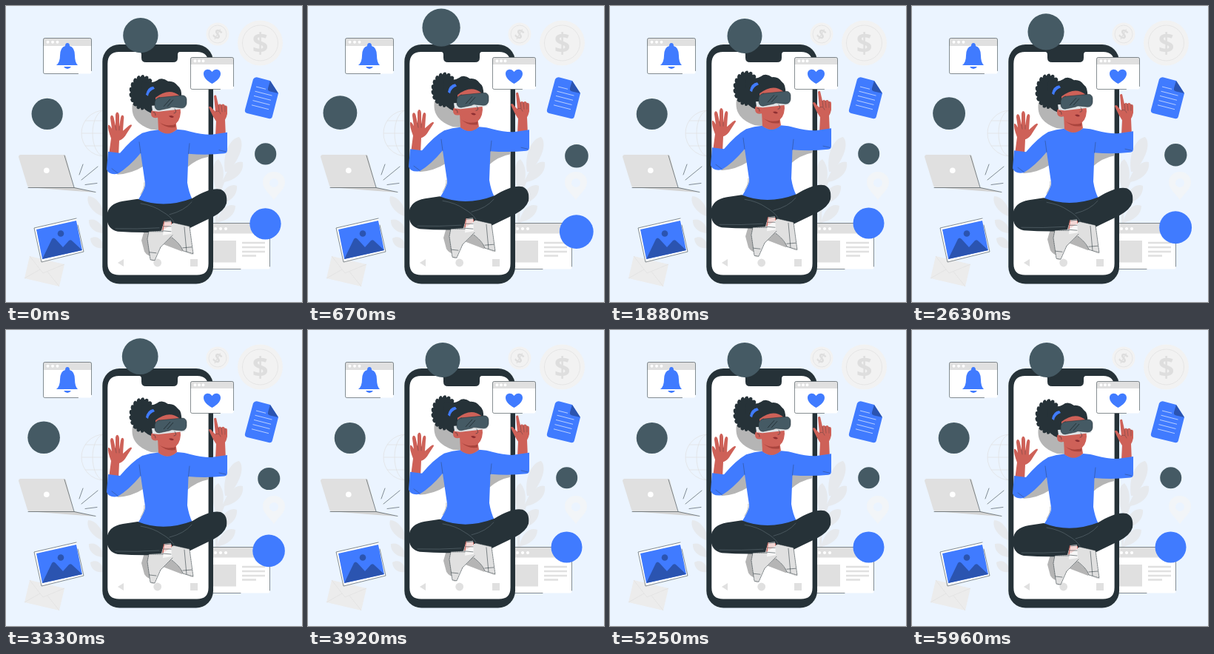
An HTML page for the animation above (6 s loop, 400 by 400 pixels).

```html
<!DOCTYPE html>
<html lang="en">
<head>
<meta charset="utf-8">
<title>Floating with a headset</title>
<style>
  html, body { margin: 0; width: 100%; height: 100%; overflow: hidden; background: #ebf4ff; }
  svg { display: block; width: 100%; height: 100%; }
  .blue { fill: #407bff; }
  .navy { fill: #2b54b0; }
  .dark { fill: #263238; }
  .slate { fill: #455a64; }
  .skin { fill: #ce6158; }
  .grey { fill: #e0e0e0; }
  .pale { fill: #f2f2f2; }
  .white { fill: #fff; }
  .line { fill: none; stroke: #263238; stroke-width: .55; stroke-linecap: round; stroke-linejoin: round; }
  .faint { fill: none; stroke: #e0e0e0; stroke-width: .7; }
  text { font-family: "Open Sans", Arial, sans-serif; font-weight: 700; text-anchor: middle; fill: #dedede; }
</style>
</head>
<body>
<svg viewBox="0 0 400 400">
  <g id="backdrop">
    <g class="faint">
      <circle cx="133" cy="172" r="31"/>
      <ellipse cx="133" cy="172" rx="16" ry="31"/>
      <path d="M102 172H164M107 155H160M107 189H160M133 141V203"/>
    </g>
    <circle class="pale" cx="343.500" cy="50" r="30.500"/>
    <circle class="faint" cx="343.500" cy="50" r="24"/>
    <text x="343.500" y="64" font-size="38">$</text>
    <circle class="pale" cx="286" cy="38" r="15.500"/>
    <circle class="faint" cx="286" cy="38" r="12"/>
    <text transform="translate(286 38) rotate(30)" y="7" font-size="19">$</text>
    <g fill="#e6e9ed">
      <path d="M284 300C280 260 290 240 301 220L303 222C292 243 284 262 287 300Z"/>
      <path d="M296 224C292 201 302 179 315 177C323 185 317 206 300 224Z"/>
      <path d="M295 236C301 218 311 208 320 211C322 224 311 235 295 238Z"/>
      <path d="M284 247C277 231 278 211 287 207C296 217 296 235 288 249Z"/>
      <path d="M286 265C292 247 304 239 312 243C313 256 303 265 286 269Z"/>
      <path d="M286 290C290 274 300 266 310 270C310 282 300 289 286 293Z"/>
      <path d="M130 284C116 279 108 266 111 257C121 257 131 269 133 284Z"/>
      <path d="M132 307C119 307 111 298 112 289C122 286 131 295 133 307Z"/>
      <path d="M132 327C121 329 114 322 114 314C123 309 131 316 133 327Z"/>
    </g>
    <path fill="#f2f5f8" fill-rule="evenodd" d="M362 262C354 251 347 247 347 238A15 14 0 0 1 377 238C377 247 370 251 362 262ZM362 233A6 6 0 1 0 362 245A6 6 0 1 0 362 233Z"/>
    <path fill="#ececec" d="M32 338L79 349L72 379L25 368Z"/>
    <path class="faint" d="M32 338L50 361L79 349M25 368L46 356M72 379L56 359"/>
  </g>

  <g id="laptop">
    <path class="grey" d="M20 201H78Q80 201 81 203L92 246H32Q30 245 29 243L17 204Q17 201 20 201Z"/>
    <path fill="#d3d3d3" d="M30 245L92 245L122 252L94 250Z"/>
    <path class="line" d="M30 245.500H92L121 251.500M79 202L92 245"/>
    <circle class="white" cx="54.800" cy="222.300" r="3.800"/>
    <path class="line" d="M99 228L104 214M102 235L124 217M107 241.500L123 239.500"/>
  </g>

  <g id="photo">
    <path class="white" d="M38 300L95 287L105 332L48 346Z"/>
    <path class="blue" d="M41 302L95 290L103 330L49 342Z"/>
    <path class="navy" d="M49 342L62 315Q64 312 67 315L77 326L85 317Q88 315 90 318L103 330Z"/>
    <circle class="navy" cx="74" cy="307.500" r="4.300"/>
    <path class="line" d="M95 287L38 300L48 346L105 332L97 296"/>
  </g>

  <g id="document">
    <path class="blue" d="M340 96.500L357 101L368 118L360 149Q359 153 355 152L326 145Q322 144 323 140L334 99Q336 95.500 340 96.500Z"/>
    <path class="navy" d="M357 101L368 118L357 115.500Q353 114.500 354 111Z"/>
    <path id="docLines" fill="none" stroke="#d6e4ff" stroke-width=".8"/>
  </g>

  <g id="page">
    <rect class="white" x="266" y="293.500" width="90.500" height="62" rx="2"/>
    <path class="grey" d="M266 293.500H354.500Q356.500 293.500 356.500 295.500V307.500H266Z"/>
    <g class="white"><circle cx="283" cy="301" r="2.100"/><circle cx="290" cy="301" r="2.100"/><circle cx="297" cy="301" r="2.100"/></g>
    <rect class="grey" x="280" y="317" width="31" height="29.500"/>
    <path stroke="#e0e0e0" stroke-width="2.300" d="M319 320H350M319 326H350M319 332H350M319 337.500H338"/>
    <path class="line" d="M270 293.500H354.500Q356.500 293.500 356.500 295.500V352M317 355.500H270"/>
  </g>

  <g id="phone">
    <rect class="dark" x="130.300" y="52" width="149.700" height="323.500" rx="23"/>
    <path class="white" d="M153 62H180Q183 62 183 66V70Q183 76 189 76H226Q232 76 232 70V66Q232 62 235 62H258Q273.600 62 273.600 78V348Q273.600 363.600 258 363.600H153Q137.300 363.600 137.300 348V78Q137.300 62 153 62Z"/>
    <path class="grey" d="M151 347L159 342V352ZM249 342H259V352H249Z"/>
    <circle class="grey" cx="204.700" cy="347" r="5.400"/>
  </g>

  <g id="person">
    <g fill="#b5b5b5">
      <path d="M171 132C168 150 178 161 196 167L210 168L215 150Z"/>
      <path d="M182 197L150 228Q170 227 187 216L190 198Z"/>
      <path d="M244 195L273.600 198V204Q257 207 244 219Z"/>
      <path d="M188 300L183 317L187 332Q192 340 201 338L212 322L238 332L247 322L229 299Z"/>
    </g>

    <path class="skin" d="M139 202L142 179Q137 166 138 161Q140 160 143 166L141 152Q141 148 143 148Q145 148 146 153L148 162L148 147Q149 143 151 144Q153 145 153 150V163L155 151Q156 147 158 148Q160 149 159 154L158 169L166 162Q170 159 170 162Q164 171 161 176Q157 181 153 182L152 203Z"/>
    <path class="skin" d="M283 176L284 156Q279 149 274 137Q276 134 279 139L283 143L281 122Q282 120 284 121L287 134Q289 131 291 134Q294 131 296 135Q299 134 299 138V146Q298 151 296 154L297 177Z"/>
    <path class="line" stroke-opacity=".6" d="M287 134L288 142M291 134L292 143M296 135V143M283 143Q288 140 290 146M148 162L149 168M153 163V168"/>

    <path class="blue" d="M184 172Q195 168 206 167.500Q218 177 231 167Q242 167.500 249 170Q266 174.500 278 174L299 171V195Q299 199 295 199.500Q272 202 246.500 200L245 239Q247 252 252 262Q234 274 205 271Q187 269 178 263Q189 246 188 240L182 199Q166 218 151 227Q139 229 136 221L138 197L154 199Q170 180 184 172Z"/>
    <path class="line" stroke-opacity=".65" d="M182 199L180 184M246.500 200L248 186M187 239Q188 246 182 255M151 226L143 220M297 197L288 195"/>

    <path class="dark" d="M178 261Q213 275 252 260Q276 245 290 248Q300 252 298 267Q295 277 280 285L249 300L236 298L214 291L209 306Q178 307 151 305Q136 302 136 284Q138 267 158 264Z"/>
    <path class="line" style="stroke:#66747b" d="M182 267Q200 270 211 278Q222 284 227 292M251 265Q241 277 221 282M148 301Q177 302 207 300"/>

    <path class="skin" d="M213 291L224 292L224 310L211 307Z"/>
    <path class="grey" d="M226 293L248 298L253 335Q253 337 250 336L239 331Q236 322 221 311Z"/>
    <path class="grey" d="M211 304L226 294L226 307Q221 316 209 326L201 344Q198 347 195 343L191 315L193 305Z"/>
    <path class="white" d="M214 291L223 290L224 308L212 310Z" opacity=".75"/>
    <path class="line" stroke-dasharray="2 1" d="M226 293L248 298L253 335L239 331Q236 322 224 313M212 305L193 305L191 315L195 343L201 344L209 326L225 310"/>
    <path class="line" d="M214 292L223 291M213 298L223 298M212 304L223 305M241 299L244 332M194 333L203 334M239 327L251 326"/>

    <path class="skin" d="M205 148L206 168Q219 178 231 167L229 154Z"/>
    <path fill="#a9443d" d="M207 157Q216 164 229 160L229 164Q216 166 207 157Z"/>
    <g class="dark">
      <path id="bun"/>
      <path d="M184 103Q198 106 207 99Q213 97 219 102Q227 101 232 108Q238 112 237 124L227 121Q214 116 205 126L202 142L196 145Q186 141 182 132Z"/>
    </g>
    <path class="skin" d="M202 124Q220 110 234 121L236 144Q235 158 226 161Q212 162 205 151Q196 153 196 145Q196 139 202 141Z"/>
    <path class="blue" d="M189 120Q191 110 199 109L201 112Q193 115 192 122Z"/>
    <path fill="#dfe5e8" d="M197 135L244 132L242 139L206 143L198 142Z"/>
    <g id="goggles">
      <path class="slate" d="M207 124L238 121Q243 121 244 126V132Q243 138 237 138L227 137Q224 136 221 138L207 141Q202 141 201 136V130Q202 125 207 124Z"/>
      <path class="line" d="M207 124L238 121Q243 121 244 126V132Q243 138 237 138L227 137Q224 136 221 138L207 141Q202 141 201 136V130Q202 125 207 124Z"/>
      <path fill="none" stroke="#263238" stroke-width="1" d="M213 136L222 126M218 136L226 127"/>
    </g>
    <path fill="#8d2f32" d="M220 149Q224 147 227 150Q224 153 220 149Z"/>
    <path class="line" d="M228 139Q232 145 227 145M199 144Q202 143 202 148"/>
  </g>

  <g id="alerts"></g>

  <g id="badges">
    <circle class="slate" cx="182" cy="40.500" r="23.500"/>
    <circle class="slate" cx="56.700" cy="146" r="21"/>
    <circle class="slate" cx="349.700" cy="199.700" r="14.500"/>
    <circle class="blue" cx="349.500" cy="293.500" r="21"/>
  </g>
</svg>

<script>
  const LOOP = 6000;
  const FLOAT = 3000;
  const LEAD = 40;
  const byId = id => document.getElementById(id);

  function alertWindow(x, y, w, h, header, dotGap, symbol) {
    const right = x + w, bottom = y + h;
    const dots = [0, 1, 2].map(i =>
      `<circle class="white" cx="${x + 6 + i * dotGap}" cy="${y + header / 2}" r="1.9"/>`).join("");
    return `<rect class="white" x="${x}" y="${y}" width="${w}" height="${h}" rx="2"/>
      <path class="grey" d="M${x} ${y + header}V${y + 2}Q${x} ${y} ${x + 2} ${y}H${right - 2}Q${right} ${y} ${right} ${y + 2}V${y + header}Z"/>
      ${dots}
      <path class="line" d="M${right - 18} ${bottom}H${x + 2}Q${x} ${bottom} ${x} ${bottom - 2}V${y + 2}Q${x} ${y} ${x + 2} ${y}H${right - 2}Q${right} ${y} ${right} ${y + 2}V${bottom - 4}"/>
      <path class="blue" d="${symbol}"/>`;
  }

  const bell = "M68 80Q73 76 73 67Q73 56 80 54Q80 50 83 50Q86 50 86 54Q93 56 93 67Q93 76 97 80ZM78 82H88Q86 85 83 85Q80 85 78 82Z";
  const heart = "M278.500 105C271 101 267 96 267 91.500C267 85 275 83.500 278.500 89C282 83.500 290 85 290 91.500C290 96 286 101 278.500 105Z";
  byId("alerts").innerHTML =
    alertWindow(50.5, 43.5, 65, 48, 10.5, 6.5, bell) +
    alertWindow(249.5, 69.5, 58, 43, 9.5, 5.5, heart);

  byId("docLines").setAttribute("d", [0, 1, 2, 3, 4].map(i => {
    const x = 338 - i * 1.5, y = 109 + i * 6.2;
    return i ? `M${x} ${y}l23 5.900` : `M${x} ${y}l13 3.300`;
  }).join(""));

  // Small hooked tips around an oval suggest curly hair.
  const TIPS = 18;
  const onBun = (step, size) => {
    const a = step / TIPS * Math.PI * 2;
    return `${184.5 + Math.cos(a) * 16 * size} ${117 + Math.sin(a) * 21 * size}`;
  };
  byId("bun").setAttribute("d", `M${onBun(0, 1)}` + Array.from({ length: TIPS }, (_, i) =>
    `Q${onBun(i + .3, 1.18)} ${onBun(i + .8, 1.12)}L${onBun(i + 1, 1)}`).join("") + "Z");

  const beat = [[0, 1], [.1, 1.1], [.3, 1], [.4, 1], [.5, 1.1], [.6, 1], [1, 1]];

  function valueAt(keys, p) {
    const i = keys.findIndex(([at]) => at > p);
    const [p0, v0] = keys[i - 1], [p1, v1] = keys[i];
    return v0 + (v1 - v0) * (p - p0) / (p1 - p0);
  }

  function render(ms) {
    const phase = ms % FLOAT / FLOAT;
    const lift = -8 * (1 - Math.abs(1 - 2 * phase));
    const scale = valueAt(beat, ms % LOOP / LOOP);
    byId("person").setAttribute("transform", `translate(0 ${lift})`);
    byId("badges").setAttribute("transform",
      `translate(203.300 165.700) scale(${scale}) translate(-203.300 -165.700)`);
  }

  const start = performance.now();
  function tick() {
    render(performance.now() - start + LEAD);
    requestAnimationFrame(tick);
  }
  tick();
</script>
</body>
</html>
```
